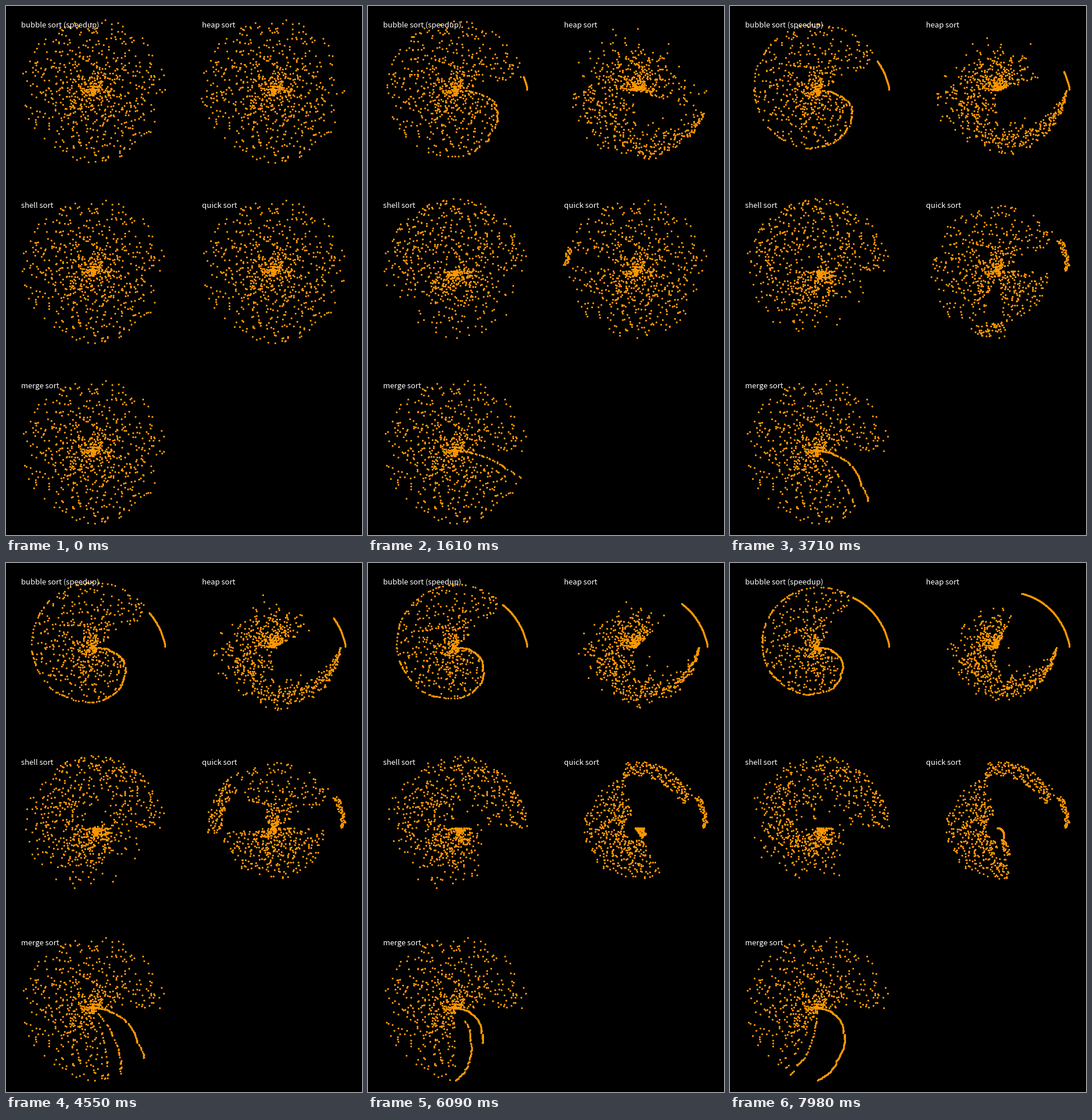
A matplotlib script for the animation above (8000 ms loop, 614 by 912 pixels).

```python
import math
import random

import matplotlib.pyplot as plt
import numpy as np
from matplotlib.animation import FuncAnimation

W, H, DPI = 614, 912, 64
PX = 72 / DPI              # points per pixel
N = 768                    # dots per panel
STEP, LOOP, TICK = 70, 8000, 20
STEPS = math.ceil(LOOP / STEP)
CX, CY, PITCH, RADIUS = 150, 145.5, 311, 124.5
ORANGE = "#ff9800"


# Each sort yields after every unit of work that counts as time.

def bubble(a):
    for end in range(N - 1, 0, -1):
        for i in range(end):
            if a[i] > a[i + 1]:
                a[i], a[i + 1] = a[i + 1], a[i]
        yield


def sift(a, root, end):
    while 2 * root + 1 < end:
        child = 2 * root + 1
        if child + 1 < end and a[child + 1] > a[child]:
            child += 1
        if a[root] >= a[child]:
            return
        a[root], a[child] = a[child], a[root]
        yield
        root = child


def heap(a):
    for root in range(N // 2 - 1, -1, -1):
        yield from sift(a, root, N)
    for end in range(N - 1, 0, -1):
        a[0], a[end] = a[end], a[0]
        yield
        yield from sift(a, 0, end)


def shell(a):
    gap = N // 2
    while gap:
        for i in range(gap, N):
            j = i
            while j >= gap:
                yield
                if a[j - gap] <= a[j]:
                    break
                a[j], a[j - gap] = a[j - gap], a[j]
                j -= gap
        gap //= 2


def partition(a, lo, hi):
    pivot, i = a[hi], lo
    for j in range(lo, hi):
        if a[j] < pivot:
            if i != j:
                a[i], a[j] = a[j], a[i]
                yield
            i += 1
    if i != hi:
        a[i], a[hi] = a[hi], a[i]
        yield
    return i


def quick(a, lo=0, hi=N - 1):
    if lo < hi:
        mid = yield from partition(a, lo, hi)
        yield from quick(a, lo, mid - 1)
        yield from quick(a, mid + 1, hi)


def merge(a, lo=0, hi=N):
    if hi - lo < 2:
        return
    mid = (lo + hi) // 2
    yield from merge(a, lo, mid)
    yield from merge(a, mid, hi)
    left, right = a[lo:mid], a[mid:hi]
    i = j = 0
    for k in range(lo, hi):
        if j == len(right) or (i < len(left) and left[i] <= right[j]):
            a[k] = left[i]
            i += 1
        else:
            a[k] = right[j]
            j += 1
        yield


def shuffled():
    """Random order whose first few quick sort pivots are chosen."""
    data = list(range(N))
    random.Random(11).shuffle(data)

    def place(i, value):
        j = data.index(value)
        data[i], data[j] = data[j], data[i]

    pivots = (711, 548, 127)
    for back, value in enumerate(pivots, 1):
        place(N - back, value)
    trial = list(data)
    for hi in (N - 1, pivots[0] - 1, pivots[1] - 1):
        for _ in partition(trial, 0, hi):
            pass
    place(data.index(trial[pivots[1] - 1]), 315)
    return data


def record(sort, data, rate, lag=0):
    """Array contents at every step, `rate` units of work apart."""
    a = list(data)
    work, done, states = sort(a), 0, []
    for k in range(STEPS):
        while done < rate * (k + 1 - lag):
            next(work, None)
            done += 1
        states.append(list(a))
    return np.array(states)


# label, sort, work per step, start delay in steps, column, row
PANELS = [
    ("bubble sort (speedup)", bubble, 1, 0, 0, 0),
    ("heap sort", heap, 16, 0, 1, 0),
    ("shell sort", shell, 15, 0, 0, 1),
    ("quick sort", quick, 16.4, 0, 1, 1),
    ("merge sort", merge, 16.45, 3.5, 0, 2),
]

fig = plt.figure(figsize=(W / DPI, H / DPI), dpi=DPI, facecolor="black")
ax = fig.add_axes([0, 0, 1, 1])
ax.set_xlim(0, W)
ax.set_ylim(H, 0)
ax.axis("off")

start = shuffled()
angle = 2 * np.pi * np.arange(N) / N
xs, ys = [], []
for label, sort, rate, lag, col, row in PANELS:
    r = (record(sort, start, rate, lag) + 1) * RADIUS / N
    xs.append(CX + PITCH * col + r * np.cos(angle))
    ys.append(CY + PITCH * row + r * np.sin(angle))
    ax.text(26.5 + PITCH * col, 37 + PITCH * row, label, color="white",
            family="Noto Sans CJK JP", size=13.1 * PX, va="baseline", zorder=3)
xs, ys = np.hstack(xs), np.hstack(ys)

dots, = ax.plot(xs[0], ys[0], "o", color=ORANGE, ms=3.2 * PX, mew=0)


def draw(frame):
    k = min((frame * TICK + TICK // 2) // STEP, STEPS - 1)
    dots.set_data(xs[k], ys[k])
    return dots,


anim = FuncAnimation(fig, draw, frames=LOOP // TICK, interval=TICK,
                     repeat=True, repeat_delay=0)
plt.show()
```
